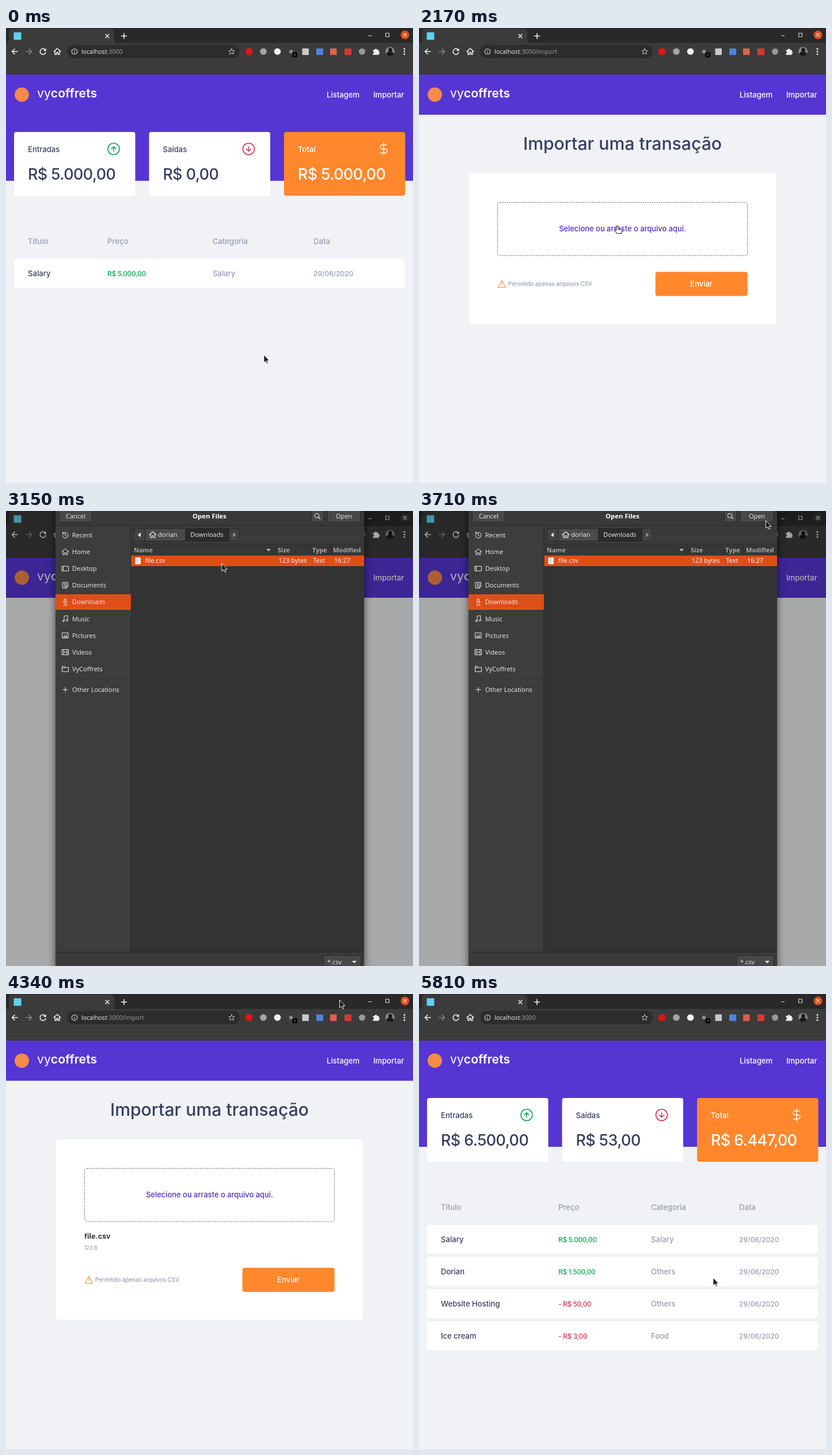
Recreate the animation shown at these times as an HTML page. Size 707 by 792 pixels, loop 8 s.

```html
<!DOCTYPE html>
<html lang="pt-BR">
<head>
<meta charset="utf-8">
<title>Importar uma transação</title>
<style>
  html, body { margin: 0; width: 100%; height: 100%; overflow: hidden; background: #f0f2f5; }
  svg { display: block; width: 707px; height: 792px; }
  text { font: 500 13.1px Inter, "Open Sans", sans-serif; white-space: pre; }
  .ui text, text.ui { font: 400 11px "Open Sans", "Noto Sans", sans-serif; }
  .ui text.bold { font-weight: 700; }
  text.money { font-size: 11.9px; letter-spacing: -.3px; }
  text.big { font-size: 26.8px; letter-spacing: -.5px; }
  .line { fill: none; stroke-linecap: round; stroke-linejoin: round; }
  #dialog { filter: drop-shadow(0 2px 7px rgba(0, 0, 0, .6)); }
</style>
</head>
<body>
<svg id="stage" viewBox="0 0 707 792"></svg>
<script>
const LOOP = 8000, TICK = 70;
const DARK = '#363f5f', MUTED = '#969cb3', GREEN = '#12a454', RED = '#d8324f';
const ORANGE = '#ff872c', PURPLE = '#5636d3', ACCENT = '#e04e17';

const text = (x, y, s, fill, attrs = '') => `<text x="${x}" y="${y}" fill="${fill}" ${attrs}>${s}</text>`;
const rect = (x, y, w, h, fill, r = 0, attrs = '') =>
  `<rect x="${x}" y="${y}" width="${w}" height="${h}" rx="${r}" fill="${fill}" ${attrs}/>`;
const disc = (x, y, r, fill, attrs = '') => `<circle cx="${x}" cy="${y}" r="${r}" fill="${fill}" ${attrs}/>`;
const line = (d, stroke, width = 1) =>
  `<path class="line" d="${d}" stroke="${stroke}" stroke-width="${width}"/>`;
const shape = (d, fill) => `<path d="${d}" fill="${fill}"/>`;
const group = (id, body, attrs = '') => `<g id="${id}" ${attrs}>${body}</g>`;
const at = (x, y, body) => `<g transform="translate(${x} ${y})">${body}</g>`;
const MID = 'text-anchor="middle"';

const HOUSE = 'M-6 0L0 -5.5L6 0M-4 -1.5V5H-1.3V1.5H1.3V5H4V-1.5';

function browser() {
  const W = '#f2f2f2';
  return rect(0, 0, 707, 27, '#292929') +
    shape('M0 27Q5 27 5 20V8Q5 1 12 1H181Q188 1 188 8V20Q188 27 194 27Z', '#3b3b3b') +
    rect(0, 26, 707, 55, '#3b3b3b') + rect(0, 80, 707, 1, '#303030') +
    rect(13.5, 7.5, 13, 13, '#5fd3ee') +
    line('M173 11l6 6m0 -6l-6 6', W, 1.5) + line('M200.5 14h9m-4.5 -4.5v9', W, 1.6) +
    line('M629.5 13.5h5', '#ddd', 1.1) + line('M659.5 9h6v6h-6z', '#ddd', 1.1) +
    disc(693, 12, 7.5, ACCENT, 'id="close"') + line('M690.5 9.5l5 5m0 -5l-5 5', '#eee', 1.1) +
    rect(106, 29.5, 300, 23, '#2c2c2c', 11.5) +
    line('M20 41H10.5M15 36.5L10.5 41L15 45.5', W, 1.6) +
    line('M35 41H44.5M40 36.5L44.5 41L40 45.5', '#858585', 1.6) +
    line('M68.5 38.5A5 5 0 1 0 69 42.5', W, 1.6) + shape('M69.5 35.5V40H65Z', W) +
    at(89, 41, line(HOUSE, W, 1.5)) +
    disc(119, 41, 4.8, 'none', 'stroke="#ddd" stroke-width="1.1"') + line('M119 40.8V43.2M119 38.7V38.8', '#ddd', 1.2) +
    `<text class="ui" x="131" y="44.8" fill="#f0f0f0" style="font-size:10.6px">localhost<tspan fill="#a0a0a0">:3000<tspan id="path"></tspan></tspan></text>` +
    at(392, 41, line('M0 -5L1.5 -1.7L5 -1.4L2.4 1L3.2 4.5L0 2.6L-3.2 4.5L-2.4 1L-5 -1.4L-1.5 -1.7Z', '#ccc', 1)) +
    disc(422, 41, 6.2, '#e01515') + disc(447, 41, 5.8, '#a5a5a5') + disc(471.5, 41, 5.8, '#f4f4f4') +
    disc(495, 41, 3.2, '#8b8b8b') + rect(497.5, 42.5, 8.5, 8.5, '#000', 1.5) + disc(501.7, 46.7, .9, '#ddd') +
    rect(514.5, 35.5, 11.5, 11.5, '#c9c9c9', 1) + rect(539, 35.5, 12, 11.5, '#4a84dc', 1) +
    rect(563, 35.5, 11.5, 11.5, '#e0604c', 1) + rect(588, 35.5, 12, 11.5, '#d23c30', 1) +
    disc(618.5, 41, 5.5, '#999') +
    shape('M637.5 38h3a2 2 0 1 1 4 0h3v3.2a1.8 1.8 0 1 1 0 3.6v2h-10v-2.8a1.8 1.8 0 1 0 0 -3.6Z', '#eee') +
    disc(667, 41, 8, '#858585') +
    shape('M660.5 45.5q1 -4 5 -4a3.2 4 0 1 1 4 0q3.5 .5 4.5 3.5a8 8 0 0 1 -13.5 .5Z', '#191919') +
    [36.5, 41, 45.5].map(y => disc(692, y, 1.4, W)).join('');
}

const header = () =>
  disc(27.5, 116, 12.5, '#f58a4b') +
  text(54, 121, 'vy<tspan font-weight="600">coffrets</tspan>', '#fff', 'style="font-size:21.2px;font-weight:400"') +
  text(557, 120.8, 'Listagem', '#fff') + text(638, 120.8, 'Importar', '#fff', 'id="nav"');

function listPage(id, totals, cols, rows) {
  const cards = ['Entradas', 'Saídas', 'Total'].map((name, i) => {
    const x = [14, 248.5, 483][i], last = i === 2, ink = last ? '#fff' : DARK;
    return rect(x, 181, 210.5, 111, last ? ORANGE : '#fff', 4) +
      text(x + 24, 215.5, name, ink) + text(x + 24, 263.5, 'R$ ' + totals[i], ink, 'class="big"');
  }).join('');
  const round = (x, dir, color) => at(x, 210.5,
    disc(0, 0, 10, 'none', `stroke="${color}" stroke-width="1.6"`) +
    line(`M0 ${-4 * dir}V${4 * dir}M-4 0L0 ${-4 * dir}L4 0`, color, 1.6));
  const heads = ['Título', 'Preço', 'Categoria', 'Data']
    .map((s, i) => text(cols[i], 375.5, s, MUTED)).join('');
  const body = rows.map(([title, price, kind], i) => {
    const y = 431.5 + i * 56;
    return rect(14, y - 29.5, 679, 50, '#fff', 5) + text(cols[0], y, title, DARK) +
      text(cols[1], y, price, price[0] === '-' ? RED : GREEN, 'class="money"') +
      text(cols[2], y, kind, MUTED) + text(cols[3], y, '29/06/2020', MUTED, 'style="font-size:12px"');
  }).join('');
  const dollar = line('M12 1V23M17 5H9.5a3.5 3.5 0 0 0 0 7h5a3.5 3.5 0 0 1 0 7H6', '#fff', 1.4);
  return group(id, rect(0, 81, 707, 185, PURPLE) + cards + round(187, 1, GREEN) +
    round(421.5, -1, RED) + at(644, 198.5, dollar) + heads + body);
}

const importPage = () => group('import',
  rect(0, 81, 707, 70, PURPLE) +
  text(353.5, 212, 'Importar uma transação', DARK, MID + ' style="font-size:30.2px"') +
  rect(87, 253, 533, 262, '#fff', 5, 'id="card"') +
  rect(136.5, 303.5, 434, 92.5, 'none', 4, 'stroke="#6c6c78" stroke-dasharray="2.4 1.6"') +
  text(353.5, 354, 'Selecione ou arraste o arquivo aqui.', '#4c2fc0', MID + ' style="font-size:12.9px"') +
  group('file', text(136, 426, 'file.csv', '#333', 'style="font-size:12.6px;font-weight:700"') +
    text(136, 444.8, '123 B', '#8c8c92', 'style="font-size:8.9px;font-weight:400"')) +
  group('send', line('M144 439.5L150.5 451.5H137.5Z', '#e59434', 1.1) + line('M144 443.5V447M144 449.2V449.3', '#e59434', 1.1) +
    text(155, 449, 'Permitido apenas arquivos CSV', MUTED, 'style="font-size:9.7px"') +
    rect(410.7, 424.4, 160, 42, ORANGE, 4) + text(490.5, 450, 'Enviar', '#fff', MID)));

function dialog() {
  const INK = '#eee', EDGE = 'stroke="#262626"';
  const button = (x, y, w, h, fill = '#484848') => rect(x + .5, y + .5, w - 1, h - 1, fill, 4, EDGE);
  const places = [
    ['Recent', 'M-3.5 -3.5A5 5 0 1 1 -5 0M-4.5 -5.5V-2.5H-1.5M0 -2.5V.5L2 1.5'],
    ['Home', HOUSE],
    ['Desktop', 'M-5.5 -4H5.5V4H-5.5ZM-3.5 -4V4'],
    ['Documents', 'M-4.5 -5H4.5V2L1.5 5H-4.5ZM-2.5 -2.5H2.5M-2.5 0H2.5M-2.5 2.5H0M1.5 5V2H4.5'],
    ['Downloads', 'M-1.5 -5H1.5V0H3.5L0 3.5L-3.5 0H-1.5ZM-3 5.5H3'],
    ['Music', 'M-2 4V-4.5L4 -5.5V3M-2 4a1.5 1.3 0 1 1 -1.5 -1.3H-2M4 3a1.5 1.3 0 1 1 -1.5 -1.3H4'],
    ['Pictures', 'M-5 -4.5H5V4.5H-5ZM-3 2.5L-1 -.5L1 1.5L2 .5L3 2.5ZM2 -2H2.5'],
    ['Videos', 'M-5.5 -4.5H5.5V4.5H-5.5ZM-3 -4.5V4.5M3 -4.5V4.5M-3 0H3'],
    ['VyCoffrets', 'M-5.5 4.5V-4.5H-1.5L0 -2.5H5.5V4.5ZM-5.5 -1.5H-1.5L0 -2.5'],
    ['Other Locations', 'M-4 0H4M0 -4V4'],
  ];
  const side = places.map(([name, icon], i) => {
    const y = i === 9 ? 311 : 42 + i * 29.1;
    return at(103, y, line(icon, INK, 1)) + text(115, y + 4, name, INK);
  }).join('');
  const heads = [[222, 'Name'], [472, 'Size'], [532, 'Type'], [568, 'Modified']]
    .map(([x, s]) => text(x, 71.5, s, '#a8a8a8', 'class="bold"')).join('');
  const cells = [[242, 'file.csv'], [473.5, '123 bytes'], [533.5, 'Text'], [570, '16:27']]
    .map(([x, s]) => text(x, 90, s, '#fff')).join('');
  return group('dialog', rect(86, -20, 536, 840, '#333') +
    rect(86, 25, 131, 743, '#3d3d3d') + rect(86, -20, 536, 45, '#393939') + rect(217, 25, 405, 32, '#3a3a3a') +
    rect(86, 24.5, 536, 1, '#262626') + rect(216.5, 25, 1, 743, '#262626') +
    rect(86, 145, 131, 27, ACCENT) + rect(86, 292, 131, 1, '#383838') + side +
    button(92, -8, 58, 28) + text(121, 13, 'Cancel', INK, MID) +
    text(353.5, 13, 'Open Files', '#fff', MID + ' class="bold" style="font-size:11.4px"') +
    button(530, -8, 22, 28) + disc(540, 8, 3.8, 'none', 'stroke="#eee"') + line('M543 11L545.5 13.5', INK, 1.2) +
    button(558, -8, 58, 28) + text(587, 13, 'Open', INK, MID) +
    button(222, 30, 184, 23, '#424242') + rect(242, 31, 69, 21, '#4a4a4a') + rect(311, 31, 76, 21, '#2b2b2b') +
    rect(241.5, 31, 1, 21, '#262626') + rect(387, 31, 1, 21, '#262626') +
    shape('M234 37.5V45.5L229 41.5Z', INK) + shape('M394.5 37.5V45.5L399 41.5Z', '#999') +
    at(255, 41.5, line(HOUSE, INK, 1.1)) + text(264, 45.2, 'dorian', INK) + text(349, 45.2, 'Downloads', INK, MID) +
    rect(217, 57, 405, 20, '#363636') + rect(217, 57, 405, 1, '#2c2c2c') +
    [466, 527, 563].map(x => rect(x, 58, 1, 19, '#2c2c2c')).join('') + heads +
    shape('M452 66H460L456 70.2Z', '#bbb') +
    rect(217.5, 77.5, 404.5, 18.5, ACCENT) + rect(224.5, 81, 9.5, 11.5, '#f4f4f4', 1) +
    line('M226.5 84H231.5M226.5 86.5H231.5M226.5 89H230', '#aaa', .8) + cells +
    rect(86, 768, 536, 40, '#3b3b3b') + rect(86, 767.5, 536, 1, '#262626') +
    button(551, 773, 66, 28) + text(558, 788.5, '*.csv', INK) +
    shape('M601 783H609L605 787.2Z', INK), 'class="ui"');
}

const arrow = '<path id="arrow" d="M0 -1V12.5L3.2 9.7L5.3 14.3L7.3 13.4L5.3 9H9.3Z" fill="#151515" stroke="#fff" stroke-width=".9"/>';
const hand = '<path id="hand" d="M-1.6 1A1.6 1.6 0 0 1 1.6 1V5L6.7 6A2 2 0 0 1 8.3 8.3L7.3 12.5H-.5L-4.7 7.5A1.3 1.3 0 0 1 -2.7 6L-1.6 7Z" fill="#fff" stroke="#222" stroke-width="1.1"/>';

const salary = ['Salary', 'R$ 5.000,00', 'Salary'];
document.getElementById('stage').innerHTML =
  rect(0, 0, 707, 792, '#f0f2f5') + browser() +
  listPage('before', ['5.000,00', '0,00', '5.000,00'], [38, 176, 359, 534], [salary]) +
  importPage() +
  listPage('after', ['6.500,00', '53,00', '6.447,00'], [38, 242, 403, 556], [salary,
    ['Dorian', 'R$ 1.500,00', 'Others'],
    ['Website Hosting', '- R$ 50,00', 'Others'],
    ['Ice cream', '- R$ 3,00', 'Food']]) +
  header() +
  group('status', shape('M0 780.5H119Q123 780.5 123 784.5V792H0Z', '#333') +
    text(2, 793, 'localhost:3000/import', '#ddd', 'style="font-size:11.4px"'), 'class="ui"') +
  rect(0, 0, 707, 792, '#000', 0, 'id="shade"') + dialog() + group('cursor', arrow + hand);

const $ = {};
document.querySelectorAll('[id]').forEach(e => $[e.id] = e);

// Each key: time followed by its values.
const MOUSE = [[0, 448, 570], [70, 448, 570], [630, 662, 122], [840, 664, 120], [1120, 664, 120],
  [1330, 635, 217], [1960, 345, 345], [2380, 344, 345], [2520, 342, 103], [3010, 342, 103],
  [3640, 602.5, 17.5], [4000, 602.5, 17.5], [4130, 579.5, 11.5], [4340, 579.5, 11.5],
  [4970, 550, 517], [5320, 511, 495], [LOOP, 511, 495]];
const NAV = [[490, 1], [630, .6], [1260, .6], [1400, 1]];
const STATUS = [[560, 0], [630, 1], [1680, 1], [1820, 0]];
const SHADE = [[2310, 0], [2450, .3], [3990, .3], [4200, 0]];
const DIALOG = [[2310, 0], [2450, 1], [3990, 1], [4120, 0]];
const HANDS = [[560, 1260], [1610, 2380], [4900, 5810]];

const linear = p => p, smooth = p => p * p * (3 - 2 * p);

function sample(keys, t, ease = linear) {
  const i = keys.findIndex(k => k[0] > t);
  if (i === 0) return keys[0].slice(1);
  if (i < 0) return keys[keys.length - 1].slice(1);
  const a = keys[i - 1], b = keys[i], p = ease((t - a[0]) / (b[0] - a[0]));
  return a.slice(1).map((v, n) => v + (b[n + 1] - v) * p);
}

const show = (e, on) => e.style.display = on ? '' : 'none';
const fade = (e, keys, t) => e.style.opacity = sample(keys, t)[0];

function draw(t) {
  const importing = t >= 770 && t < 5740, picked = t >= 4060, modal = t >= 2380 && t < 4060;
  show($.before, t < 770);
  show($.import, importing);
  show($.after, t >= 5740);
  $.path.textContent = importing ? '/import' : '';
  show($.file, picked);
  $.card.setAttribute('height', picked ? 314 : 262);
  $.send.setAttribute('transform', `translate(0 ${picked ? 52 : 0})`);
  $.close.setAttribute('fill', modal ? '#3d3d3d' : ACCENT);
  fade($.nav, NAV, t);
  fade($.status, STATUS, t);
  fade($.shade, SHADE, t);
  fade($.dialog, DIALOG, t);
  show($.dialog, t > 2310 && t < 4120);
  $.cursor.setAttribute('transform', `translate(${sample(MOUSE, t, smooth)})`);
  const pointing = HANDS.some(([from, to]) => t >= from && t < to);
  show($.hand, pointing);
  show($.arrow, !pointing);
}

const start = performance.now();
let last = -1;
function loop() {
  const t = Math.floor((performance.now() - start) % LOOP / TICK) * TICK;
  if (t !== last) draw(last = t);
  requestAnimationFrame(loop);
}
loop();
</script>
</body>
</html>
```
